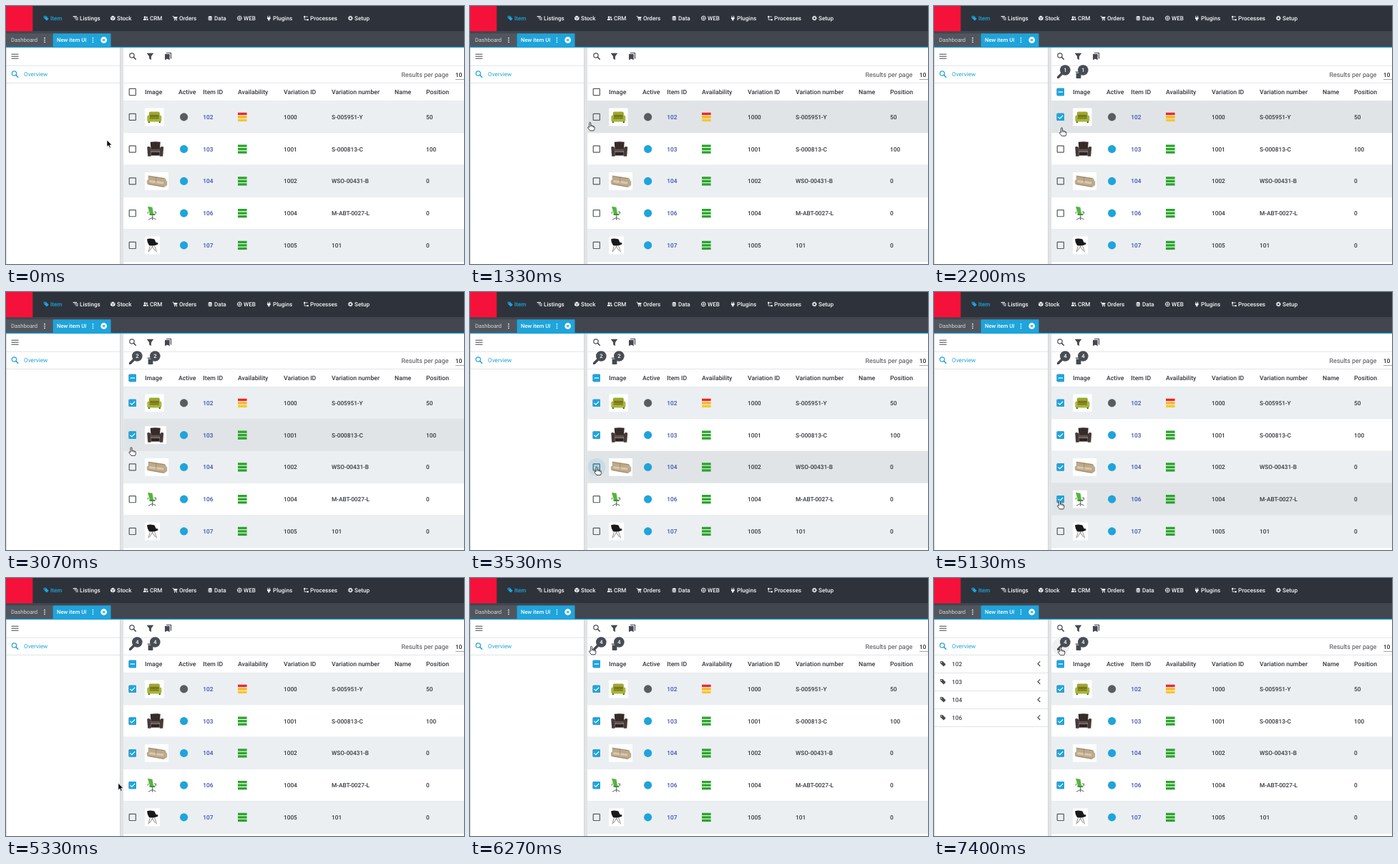
Animation of 640x360 px, one loop 8000 ms. Source, as an HTML page:

```html
<!DOCTYPE html>
<html lang="en">
<head>
<meta charset="utf-8">
<title>Item overview</title>
<style>
html, body { margin: 0; width: 100%; height: 100%; overflow: hidden; background: #fff; }
svg { display: block; width: 100vw; height: 100vh; }
text { font-family: Roboto, "Noto Sans", sans-serif; font-weight: 500; white-space: pre; text-rendering: geometricPrecision; }
</style>
</head>
<body>
<svg id="stage" viewBox="0 0 640 360" xmlns="http://www.w3.org/2000/svg"></svg>
<script>
const LOOP = 8000;
const BLUE = '#1fa4db', INK = '#464a50', TEXT = '#33363b', GREEN = '#2aa52a';
const TOP = 132.5, PITCH = 44.75, BOX_X = 176.8;
const stage = document.getElementById('stage');

const rect = (x, y, w, h, fill, more = '') =>
  `<rect x="${x}" y="${y}" width="${w}" height="${h}" fill="${fill}" ${more}/>`;
const circle = (x, y, r, fill, more = '') =>
  `<circle cx="${x}" cy="${y}" r="${r}" fill="${fill}" ${more}/>`;
const text = (x, y, s, size, fill, more = '') =>
  `<text x="${x}" y="${y}" font-size="${size}" fill="${fill}" ${more}>${s}</text>`;
const shape = (d, fill, more = '') => `<path d="${d}" fill="${fill}" ${more}/>`;
const line = (d, color, w = 1, more = '') =>
  `<path d="${d}" fill="none" stroke="${color}" stroke-width="${w}" ${more}/>`;
const at = (x, y, body, scale = 1) => `<g transform="translate(${x} ${y}) scale(${scale})">${body}</g>`;
const REGULAR = 'style="font-weight:400"';

const tagIcon = (c, hole) =>
  shape('M-4-3.6H-.6L3.8 .8 .8 3.8-4-.6Z', c) + circle(-2.3, -2, .8, hole);
const searchIcon = c => circle(-1, -1, 3.2, 'none', `stroke="${c}" stroke-width="1.2"`) +
  line('M1.4 1.4L4.7 4.7', c, 1.5);
const gearIcon = c => circle(0, 0, 2.2, 'none', `stroke="${c}" stroke-width="1.5"`) +
  circle(0, 0, 3.3, 'none', `stroke="${c}" stroke-width="1.1" stroke-dasharray="1.3 1.29"`);
const kebab = (x, y) => [-2.8, 0, 2.8].map(d => circle(x, y + d, .85, '#fff')).join('');

function topBar() {
  const W = '#f4f5f6', DARK = '#2e333b';
  const icons = [
    tagIcon(BLUE, DARK),
    line('M-4-2.6H2M-2-.2H4M0 2.2H4', W, 1.2),
    shape('M0-3.8L3.5-2V2L0 3.8-3.5 2V-2Z', W) + line('M-3.3-1.8L0 0 3.3-1.8M0 0V3.6', DARK, .7),
    circle(-1.4, -1.6, 1.5, W) + circle(1.7, -1.3, 1.2, W) + shape('M-4 3Q-4 .4-1.4 .4T1.2 3ZM1.8 3Q2 1.5 1.3 .4 4 .2 4 3Z', W),
    line('M-4-3H-2.6L-1 1.2H3', W, 1) + shape('M-2.2-2.2H3.8L2.8 .6H-1.2Z', W) + circle(-.6, 2.9, .9, W) + circle(2.4, 2.9, .9, W),
    shape('M-3-2.3Q0-4.6 3-2.3V2.4Q0 4.6-3 2.4Z', W) + line('M-3-1Q0 .8 3-1M-3 1.2Q0 3 3 1.2', DARK, .7),
    circle(0, 0, 3.3, 'none', `stroke="${W}" stroke-width="1"`) + line('M-3 0H3M0-3V3', W, .8),
    shape('M-2.6-1H2.6V.8L1 2.2V3.8H-1V2.2L-2.6 .8Z', W) + line('M-1.4-3.6V-1M1.4-3.6V-1', W, 1.1),
    circle(-2.4, -2.2, 1.3, W) + circle(2.6, 2.4, 1.3, W) + line('M-2.4-2V2.4H2M-1-2.2H3', W, .9),
    gearIcon(W)
  ];
  const names = ['Item', 'Listings', 'Stock', 'CRM', 'Orders', 'Data', 'WEB', 'Plugins', 'Processes', 'Setup'];
  const xs = [62, 103, 155, 201, 242, 291, 332, 373, 425, 487];
  return rect(0, 0, 640, 35, DARK) + rect(0, 0, 37.3, 35.3, '#f5123a') +
    names.map((n, i) => at(xs[i] - 5.7, 17, icons[i], .9) + text(xs[i], 19.9, n, 8.1, i ? W : BLUE)).join('');
}

function tabBar() {
  return rect(0, 35, 640, 23, '#42464e') +
    rect(0, 38.3, 65, 18.7, '#51565e') + text(7, 50.2, 'Dashboard', 7.7, '#d3d6d9', REGULAR) + kebab(54, 47.5) +
    rect(65.5, 38.3, 81, 19, BLUE) + text(71, 50.2, 'New item UI', 7.65, '#fff') + kebab(121.5, 47.5) +
    circle(136.7, 47.5, 4.4, '#fff') + line('M135 45.8L138.4 49.2M138.4 45.8L135 49.2', BLUE, 1.1) +
    rect(0, 56.9, 640, 1.3, BLUE);
}

function sidebar() {
  const rule = y => rect(0, y, 159.5, .8, '#d9dcdf');
  const items = ['102', '103', '104', '106'].map((id, i) => {
    const y = 119.7 + 25 * i;
    return at(12.7, y, tagIcon(INK, '#fff')) + text(25, y + 3, id, 8.3, INK) +
      line(`M148.3 ${y - 3.3}L145 ${y}L148.3 ${y + 3.3}`, INK, 1.2) + rule(y + 12.3);
  }).join('');
  return rect(0, 58, 160, 302, '#fff') + rect(0, 58, .7, 302, '#c5c9cc') +
    line('M7.5 67.2H17.5M7.5 70.2H17.5M7.5 73.2H17.5', INK, 1.1) + rule(82.8) +
    at(12.5, 95, searchIcon(BLUE)) + text(25, 98, 'Overview', 8.2, BLUE, REGULAR) + rule(107) +
    `<g id="items">${items}</g>` +
    rect(159.5, 58, 4.7, 302, '#e1e4e6') + rect(159.3, 58, .7, 302, '#c8ccd0');
}

const checkbox = (y, id, mark) =>
  rect(BOX_X - 4.6, y - 4.6, 9.2, 9.2, 'none', 'rx=".8" stroke="#585c61" stroke-width="1.2"') +
  `<g id="${id}">` + rect(BOX_X - 5.2, y - 5.2, 10.4, 10.4, BLUE, 'rx="1"') +
  at(BOX_X, y, line(mark, '#fff', 1.2)) + '</g>';

function thumb(i, y) {
  const bg = w => rect(194, y - 12.4, w, 24.8, '#fff');
  const art = [
    bg(26.5) + at(207.3, y, rect(-7.5, -7.5, 15, 8, '#93ad2c', 'rx="2"') + rect(-10, -2.5, 20, 9, '#a3b834', 'rx="2"') +
      rect(-6.5, -3, 13, 3.2, '#8f6a2a') + rect(-6.5, .6, 13, 2.2, '#6c861f') + rect(-8.5, 6.3, 2, 1.8, '#594021') + rect(6.5, 6.3, 2, 1.8, '#594021')),
    bg(30) + at(208.7, y, shape('M-7-10Q0-11 7-10L6 3H-6Z', '#352b2a') + shape('M-11.5-3Q-7.5-5-6-1V10H-10.5Z', '#463a38') +
      shape('M11.5-3Q7.5-5 6-1V10H10.5Z', '#463a38') + rect(-6, .2, 12, 4, '#62534f', 'rx="1"') + rect(-6, 4.4, 12, 4.6, '#2c2423')),
    bg(33) + at(210.7, y, shape('M-12-8L11-4.5Q13-4 13-1L14.5 0V5.5L10 8.5-13 4.5Q-15.5-1-12-2Z', '#bda98c') +
      shape('M-10-1.5L10 1.2 9 4.2-11 1.5Z', '#d8c8ae') + line('M-11.5-7L11-3.5M-1-5.5V2.5M-12 4L9.5 7.8', '#937e63', .7)),
    bg(20) + at(203.5, y, shape('M-5.5-9.5L1-8.5 2.5 .5-2.5 1Z', '#55b53c') + shape('M-3.5 .6H5.5L4.5 2.8H-2.5Z', '#3a9a30') +
      line('M-5.5 .5L-4.5-2.5M6 .8V-2H3.5', '#50554f', .9) + line('M1 3V6.3M-4.5 9L1 6.3 6 8.7M1 6.3V9.6', '#5b6166', 1)),
    bg(21) + at(204.5, y, shape('M-7.5-8.5Q-4-10.5 3-8.5L5-4 8-3.5 7.5-1.2Q2 1.5-4.5 .2-7-3-7.5-8.5Z', '#17191c') +
      line('M-3 0L-5.5 9.5M3 .3L6 9.5M-1 .3L4 8M1 .3L-4 8', '#6f7378', .8))
  ];
  return art[i];
}

const rows = [
  ['102', '1000', 'S-005951-Y', '50'],
  ['103', '1001', 'S-000813-C', '100'],
  ['104', '1002', 'WSO-00431-B', '0'],
  ['106', '1004', 'M-ABT-0027-L', '0'],
  ['107', '1005', '101', '0']
];
const midY = i => TOP + PITCH * (i + .5);
const rowFill = i => i % 2 ? '#ffffff' : '#ebeff2';

function row(r, i) {
  const y = midY(i), b = y + 3;
  const bars = i ? [GREEN, GREEN, GREEN] : ['#ee262a', '#f7b71c', '#f9c62a'];
  return rect(164.2, TOP + PITCH * i, 476, PITCH, rowFill(i), `id="row${i}"`) +
    rect(164.2, TOP + PITCH * (i + 1) - .4, 476, .7, '#dfe3e5') +
    circle(BOX_X, y, 0, '#777', `id="ripple${i}"`) +
    checkbox(y, 'check' + i, 'M-3.3 0L-1 2.3 3.4-2.3') + thumb(i, y) +
    circle(248.6, y, 5.6, i ? BLUE : '#595d62') + text(275.3, b, r[0], 8.3, '#3a4cb2') +
    bars.map((c, k) => rect(324, y - 6.1 + 4.5 * k, 12.6, 3.3, c)).join('') +
    text(388, b, r[1], 8.25, TEXT) + text(455, b, r[2], 8.25, TEXT) + text(587, b, r[3], 8.25, TEXT);
}

function table() {
  const heads = [['Image', 194], ['Active', 241], ['Item ID', 275.3], ['Availability', 324], ['Variation ID', 388],
    ['Variation number', 455], ['Name', 543], ['Position', 587]];
  const rule = y => rect(164.2, y, 476, .8, '#dcdfe2');
  const badge = x => circle(x, 89.5, 7.3, '#484d55') +
    `<text class="count" x="${x}" y="92.1" font-size="7.6" fill="#fff" text-anchor="middle"></text>`;
  return at(177, 70, searchIcon(INK)) + at(201.5, 70.3, shape('M-4.8-4.6H4.8L1.4 .2V5L-1.4 3.2V.2Z', INK)) +
    at(226.5, 70, shape('M-4.5-3H2.2V5.2L-1.1 3.8-4.5 5.2Z', INK) + line('M-2.6-4.5H4V3.6', INK, 1.2)) +
    rule(82.8) + text(552.5, 98.9, 'Results per page', 8.9, INK, REGULAR) + text(628, 99.4, '10', 8.2, '#25282d') +
    rect(628, 102.2, 12, .8, '#8b8f94') +
    circle(177, 95.5, 0, '#000', 'id="press"') +
    '<g id="tools">' + at(178, 95, shape('M-6 6V3.5L2-4.5 4.5-2-3.5 6Z', INK)) +
    at(202, 96, shape('M-3.4-2.6H3.4V4Q3.4 5 2.4 5H-2.4Q-3.4 5-3.4 4ZM-4.3-4.6H4.3V-3.3H-4.3Z', INK)) +
    badge(183.3) + badge(208.3) + '</g>' +
    rule(107) + checkbox(120, 'checkAll', 'M-3.2 0H3.2') +
    heads.map(([s, x]) => text(x, 123.1, s, 8.7, TEXT)).join('') + rule(132) +
    rows.map(row).join('');
}

stage.innerHTML = rect(0, 0, 640, 360, '#fff') + table() + sidebar() + tabBar() + topBar() +
  `<g id="cursor">
    <path id="arrow" d="M0 0V9.6L2.2 7.6 3.7 11.1 5.4 10.4 3.9 7H7Z" fill="#000" stroke="#fff" stroke-width=".7"/>
    <path id="hand" d="M-1 6.2V.9a1 1 0 0 1 2 0V4q1.8-.3 2 .7 1.5-.3 1.8.7 1.5 0 1.5 1.3V8.6q0 1.3-1 2.8H0q-1.2-1.6-3-3.8-.4-1.2.8-1.4.7.1 1.2.7ZM1 4V6M3 4.8V6.5M4.8 5.6V7" fill="#fff" stroke="#111" stroke-width=".8"/>
  </g>`;

const $ = id => document.getElementById(id);
const counts = [...document.querySelectorAll('.count')];
const clamp = v => Math.max(0, Math.min(1, v));

// [time, x, y]; equal neighbours are rests
const path = [
  [0, 141, 187], [930, 141, 187], [1530, 177, 154], [2050, 177, 154], [2200, 178.5, 169.8],
  [2530, 176, 198], [2930, 176, 198], [3070, 175, 216.8], [3470, 177, 244], [4000, 177, 244],
  [4230, 174.6, 290], [4600, 174.6, 290], [4730, 175.5, 291.5], [5250, 175.5, 291.5], [5330, 157, 286.5],
  [5620, 125.5, 235], [6070, 156.5, 111], [6470, 176.5, 96.3], [LOOP, 176.5, 96.3]
];
const still = (a, b) => a[1] === b[1] && a[2] === b[2];

function slope(i, k) {
  const a = path[i - 1], p = path[i], b = path[i + 1];
  if (!a || !b || still(a, p) || still(p, b)) return 0;
  return (b[k] - a[k]) / (b[0] - a[0]);
}

function pointer(t) {
  let i = 0;
  while (i < path.length - 2 && t >= path[i + 1][0]) i++;
  const a = path[i], b = path[i + 1], d = b[0] - a[0], u = clamp((t - a[0]) / d);
  const ease = u * u * (3 - 2 * u);
  return [1, 2].map(k => a[k] + (b[k] - a[k]) * ease +
    d * (slope(i, k) * u * (1 - u) ** 2 - slope(i + 1, k) * u * u * (1 - u)));
}

// [press, check] per row
const clicks = [[1730, 1800], [2800, 2860], [3410, 3510], [4200, 4320]];

function draw(t) {
  const [x, y] = pointer(t);
  const onRow = x > 164.2 && y > TOP ? Math.floor((y - TOP) / PITCH) : -1;
  const hand = onRow >= 0 || (x > 167 && y < 107);
  $('cursor').setAttribute('transform', `translate(${x} ${y})`);
  $('hand').style.display = hand ? '' : 'none';
  $('arrow').style.display = hand ? 'none' : '';

  rows.forEach((r, i) => {
    $('row' + i).setAttribute('fill', i === onRow ? '#e0e4e6' : rowFill(i));
    const [press, check] = clicks[i] || [LOOP, LOOP];
    $('check' + i).style.opacity = clamp((t - check) / 90);
    const ripple = $('ripple' + i), fade = 1 - clamp((t - check) / 270);
    ripple.setAttribute('r', 12.4 * clamp((t - press) / 70));
    ripple.setAttribute('fill', t < check ? '#6b6767' : BLUE);
    ripple.style.opacity = .14 * fade * fade;
  });

  const n = clicks.filter(c => t >= c[1] + 60).length;
  counts.forEach(c => { c.textContent = n || ''; });
  $('tools').style.display = n ? '' : 'none';
  $('checkAll').style.opacity = n ? 1 : 0;

  const press = $('press');
  press.setAttribute('r', 12 * clamp((t - 7000) / 200));
  press.style.opacity = t < 7000 ? 0 : .12 - .06 * clamp((t - 7200) / 200);
  $('items').style.display = t >= 7200 ? '' : 'none';
}

function tick() {
  draw(performance.now() % LOOP);
  requestAnimationFrame(tick);
}
tick();
</script>
</body>
</html>
```
